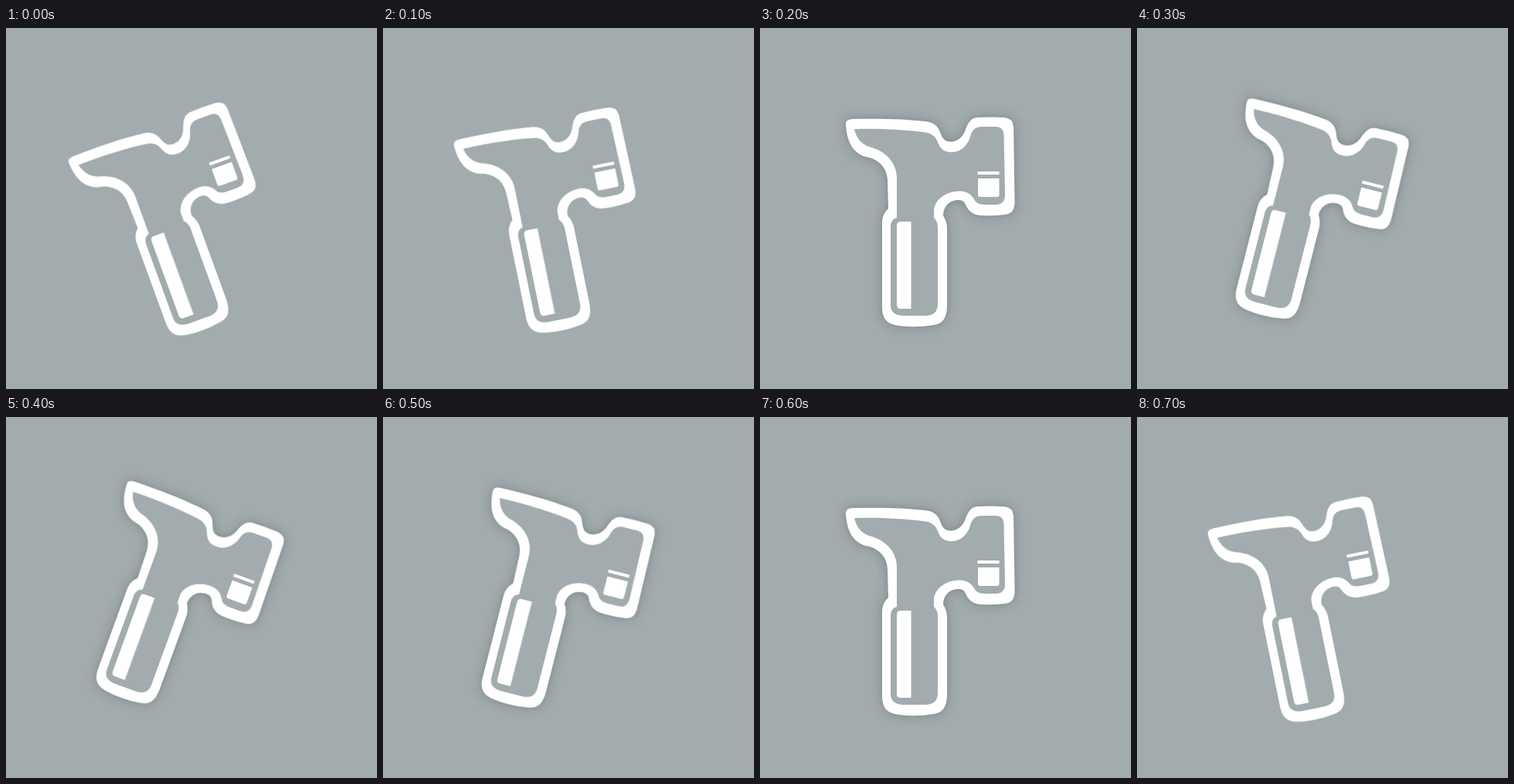
An HTML page for the animation above (0.8 s loop, 480x468 px).

```html
<!DOCTYPE html>
<html lang="en">
<head>
<meta charset="utf-8">
<title>Hammer</title>
<style>
  html, body { margin: 0; width: 100%; height: 100%; overflow: hidden; background: #a2abad; }
  svg { display: block; width: 480px; height: 468px; }
  #hammer { transform-origin: 240px 234px; }
  #shadow { fill: #3c4649; fill-opacity: .38; }
  .white { fill: #fff; }
  .grey { fill: #a2abad; }
</style>
</head>
<body>
<svg viewBox="0 0 480 468">
  <defs>
    <filter id="blur" x="-20%" y="-20%" width="140%" height="140%">
      <feGaussianBlur stdDeviation="7"/>
    </filter>
    <path id="outer" d="M111 124 Q111 118 120 118 C155 117 190 118 213 121
      C225 122 230 127 233 135 C236 144 240 147.500 247 147.500 C256 147 262 141 265 134
      C268 126 271 117 281 116 Q298 115 316 116 Q327 117 328 128
      L329.500 223 C330 236 326 241 316 242 Q302 244 286 243 C274 242 269 236 266 229
      C264 224 261 223 255 223 C245 224 237 231 237 243 Q242 251 242 260
      L242 358 C242 376 237 383 225 385 Q202 389 180 386 C164 384 158 377 158 361
      L158 254 C158 244 161 239 166 234 L165 197 C164 183 157 173 142 168
      C120 165 112 147 111 124 Z"/>
  </defs>
  <g id="hammer">
    <g id="shadow"><use href="#outer" filter="url(#blur)"/></g>
    <use href="#outer" class="white"/>
    <path class="grey" d="M122 131 C155 130 188 132 211 135 C222 136 227 140 230 148
      C233 157 239 161 247 161 C258 161 266 155 271 144 C274 133 277 128 287 128
      L305 128 Q315 128 315.500 139 L317 216 Q317 229 305 229 L290 229
      Q280 229 277 222 L275 219 C270 213 264 211.500 257 211.500 C240 212 226 223 225 236
      L225 246 Q230 250 230 259 L230 358 Q230 372 215 373 L184 373
      Q169 372 169 359 L169 258 Q169 248 177 246 L177 194
      C177 176 164 161 145 155 C132 152 125 144 122 131 Z"/>
    <path class="white" d="M195.500 251 H182 Q177 251 177 256 V359 Q177 364 182 364 H195.500 Z"/>
    <path class="white" d="M281.500 186 H309.500 V190 H281.500 Z"/>
    <path class="white" d="M282 195 H309.500 V216 Q309.500 219 306.500 219 H285 Q282 219 282 216 Z"/>
  </g>
</svg>
<script>
  const angles = [-20, -11.5, 0, 14.3, 20, 14.3, 0, -11.5];
  const timing = { duration: 800, iterations: Infinity };

  // Each pose holds for one step; the last repeats the first to close the loop.
  const hold = pose => [...angles, angles[0]].map((a, i) => ({
    ...pose(a),
    offset: i / angles.length,
    easing: 'step-end'
  }));

  const play = (id, pose) => document.getElementById(id).animate(hold(pose), timing);

  play('hammer', a => ({ transform: `rotate(${a}deg)` }));
  play('shadow', a => ({ opacity: a < 0 ? 0 : 1 }));
</script>
</body>
</html>
```
